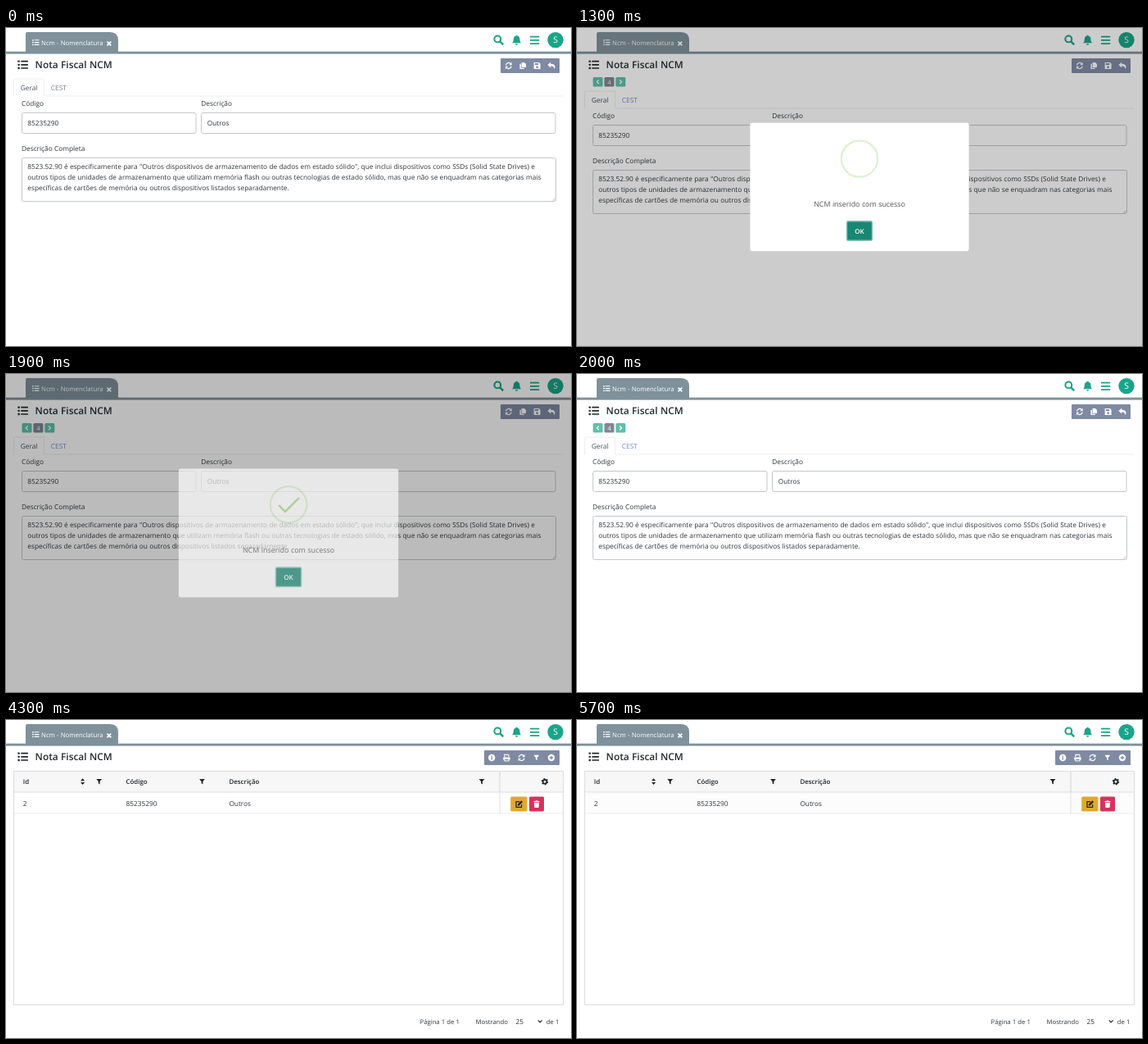
Recreate the animation shown at these times as an HTML page. Size 690 px wide and 388 px high, loop 6500 ms.

```html
<!DOCTYPE html>
<html lang="pt">
<head>
<meta charset="utf-8">
<style>
  html, body { margin: 0; width: 100%; height: 100%; overflow: hidden; background: #fff; }
  svg { display: block; width: 690px; height: 388px; }
  text { font-family: "Open Sans", "Noto Sans", sans-serif; word-spacing: .018em; text-rendering: geometricPrecision; white-space: pre; }
</style>
</head>
<body>
<svg id="stage" viewBox="0 0 690 388"></svg>
<script>
const GREEN = '#1aa589', SLATE = '#7f919b', BAR = '#7f8aa3', INK = '#30353a';

const text = (x, y, s, size = 8.3, fill = INK, extra = '') =>
  `<text x="${x}" y="${y}" font-size="${size}" fill="${fill}" ${extra}>${s}</text>`;
const rect = (x, y, w, h, fill, r = 0, extra = '') =>
  `<rect x="${x}" y="${y}" width="${w}" height="${h}" rx="${r}" fill="${fill}" ${extra}/>`;
const line = (d, color, w = 1, extra = '') =>
  `<path d="${d}" fill="none" stroke="${color}" stroke-width="${w}" ${extra}/>`;
const shape = (d, fill, extra = '') => `<path d="${d}" fill="${fill}" ${extra}/>`;
const at = (x, y, body, scale = 1) => `<g transform="translate(${x} ${y}) scale(${scale})">${body}</g>`;
const group = (id, body) => `<g id="${id}">${body}</g>`;
const field = (x, y, w, h) => rect(x, y, w, h, '#fff', 2, 'stroke="#c3c7cb"');
const BOLD = 'font-weight="600"';

// Icons, centred on 0,0
const list = c => [-4, 0, 4].map(y =>
  rect(-6, y - 1.1, 2.3, 2.3, c, .7) + rect(-2.4, y - .8, 8.4, 1.6, c, .4)).join('');
const filter = c => shape('M-3.4-3.2h6.8l-2.5 3.1v3.4l-1.8-1.2v-2.2z', c);
const refresh = c => line('M-3.4-.7A3.5 3.5 0 0 1 2.7-2.3M3.4.7A3.5 3.5 0 0 1-2.7 2.3', c, 1.3) +
  shape('M3.9-4.2v3.4h-3.4zM-3.9 4.2v-3.4h3.4z', c);
const copy = c => shape('M-1.6-4h3.4l2 2v4h-5.4zM-3.8-2.2h1.5v4.9h3.9v1.4h-5.4z', c);
const save = c => shape('M-4-4h6.3l1.7 1.7v6.3h-8zM-2.8-2.9v2h4.4v-2zM0 .3a1.4 1.4 0 1 0 .01 0z', c, 'fill-rule="evenodd"');
const reply = c => shape('M-4.6-1l3.8-3.3v2c3.4 0 5.3 1.2 5.3 3.6 0 1.2-.7 2.2-1.6 2.8.8-2.7-.7-3.6-3.7-3.6v2z', c);
const info = c => `<circle r="4.2" fill="${c}"/>` + rect(-.7, -.7, 1.4, 3.2, BAR) + rect(-.7, -2.5, 1.4, 1.3, BAR);
const plus = c => `<circle r="4.2" fill="${c}"/>` + line('M-2.3 0h4.6M0-2.3v4.6', BAR, 1.3);
const print = c => rect(-4.2, -.6, 8.4, 3.3, c, .8) + line('M-2.6-.6v-3h4.4l.8.8v2.2', c, 1.1) +
  rect(-2.6, 1.2, 5.2, 2.7, BAR, 0, `stroke="${c}"`);
const gear = c => `<circle r="2.4" fill="none" stroke="${c}" stroke-width="1.8"/>` +
  `<circle r="3.6" fill="none" stroke="${c}" stroke-width="1.2" stroke-dasharray="1.8 1.97"/>`;
const pencil = c => line('M1-2.8h-4.2v6.6h6.6v-3.4', c, 1.2) + line('M-1 1.6L4-3.4', c, 2.2);
const trash = c => rect(-3.6, -3.7, 7.2, 1.2, c, .3) + rect(-1.3, -4.3, 2.6, 1, c) +
  shape('M-3.1-1.9h6.2l-.4 5.5q0 .7-.8.7h-3.8q-.8 0-.8-.7z', c);

const toolbar = (x, icons, gap) => rect(x, 37, 676 - x, 18, BAR, 1) +
  icons.map((icon, i) => at(666 - gap * (icons.length - 1 - i), 46, icon('#fff'))).join('');

const topBar =
  shape('M24 29V7q0-2 2-2h101q10 0 10 10v14z', SLATE) + rect(0, 28.7, 690, 2.9, SLATE) +
  at(36.3, 17.6, list('#fff'), .7) + text(43, 20.8, 'Ncm - Nomenclatura', 7.8, '#fff') +
  line('M123.5 16.6l4.8 4.8m0-4.8l-4.8 4.8', '#fff', 1.7) +
  `<circle cx="600.3" cy="13.4" r="3.9" fill="none" stroke="${GREEN}" stroke-width="2.1"/>` +
  line('M603 16.2l4.2 4.2', GREEN, 2.4) +
  shape('M618 18.2c1.6-1.5 1.7-2.6 1.8-5 .1-2.200 1.300-3.300 3-3.700v-.8h1.600v.8c1.700.4 2.900 1.500 3 3.700.1 2.400.2 3.500 1.800 5zM622 19.200h3.200a1.600 1.600 0 0 1-3.200 0z', GREEN) +
  line('M640 10.700h11.200m-11.200 4.200h11.200m-11.200 4.200h11.200', GREEN, 1.700) +
  `<circle cx="671" cy="14.600" r="9.700" fill="${GREEN}"/>` +
  text(671, 18.400, 'S', 10.400, '#fff', 'text-anchor="middle"');

const title = at(20.700, 44.800, list('#25292d'), 1.050) + text(35.600, 49, 'Nota Fiscal NCM', 11.900, '#25292d', BOLD);

const pagerButton = (x, fill, body) => rect(x, 60, 12, 11.600, fill, 1.500) + at(x + 6, 65.800, body);
const pager =
  pagerButton(19.500, '#5fc0a9', line('M1.200-2.400l-2.400 2.400 2.400 2.400', '#fff', 1.300)) +
  pagerButton(33.400, '#7f8795', text(0, 2.800, '4', 7.600, '#fff', 'text-anchor="middle"')) +
  pagerButton(47.300, '#5fc0a9', line('M-1.200-2.400l2.400 2.400-2.400 2.400', '#fff', 1.300));

const paragraph = [
  '8523.52.90 é especificamente para "Outros dispositivos de armazenamento de dados em estado sólido", que inclui dispositivos como SSDs (Solid State Drives) e',
  'outros tipos de unidades de armazenamento que utilizam memória flash ou outras tecnologias de estado sólido, mas que não se enquadram nas categorias mais',
  'específicas de cartões de memória ou outros dispositivos listados separadamente.'];

const formBody =
  line('M9.500 83.500v-20q0-1.500 1.500-1.500h34q1.500 0 1.500 1.500v19.500H680', '#eceef0') +
  text(17.800, 76, 'Geral', 8.300, '#495057') + text(54.800, 76, 'CEST', 8.300, '#7a8087', 'id="cest"') +
  text(19, 94.700, 'Código') + text(238.300, 94.700, 'Descrição') +
  field(19.500, 103.500, 212.500, 25) + field(238.500, 103.500, 432.500, 25) +
  text(26.300, 119.100, '85235290') + text(245.800, 119.100, 'Outros') +
  text(19, 149.700, 'Descrição Completa') + field(19.500, 158.500, 652, 53) +
  line('M667.500 210.500l3-3m-1 3l1-1', '#999', .600) +
  paragraph.map((s, i) => text(26.300, 171.700 + 13.200 * i, s)).join('');

const form = group('pager', pager) + group('formBody', formBody) +
  toolbar(604, [refresh, copy, save, reply], 17.400) +
  rect(640.500, 37, 17, 18, '#5b6fae', 1, 'id="saveFocus" fill-opacity=".35"') +
  rect(658, 37.500, 17.500, 17, '#3f4a66', 1, 'id="backHover" fill-opacity=".35"');

const row = rect(10, 88.500, 670, 25.500, '#000', 0, 'id="rowHover"') +
  text(20.800, 104.500, '2') + text(146.500, 104.500, '85235290') + text(272.400, 104.500, 'Outros') +
  line('M10 114h670', '#ebebeb') +
  rect(616.200, 93.500, 20.300, 18, '#e0a92e', 1.500) + at(626.200, 102.500, pencil('#222')) +
  rect(639, 93.500, 18, 18, '#d6335c', 1.500) + at(648, 102.600, trash('#fff')) +
  line('M603 88.500v25.500', '#e0e0e0') +
  text(505.600, 370.600, 'Página 1 de 1', 7.700) + text(659.800, 370.600, 'de 1', 7.700);

const table = toolbar(584, [info, print, refresh, filter, plus], 18.200) +
  rect(9.500, 62.500, 671, 285, '#fff', 0, 'stroke="#dcdcdc"') +
  rect(10, 63, 670, 25, '#f7f7f8') + line('M10 88h670', '#dedede') + line('M603 63v25', '#d4d4d8') +
  [['Id', 20.800], ['Código', 146.500], ['Descrição', 272.400]].map(([s, x]) => text(x, 78.400, s, 7.900, '#212529', BOLD)).join('') +
  shape('M91 74.300l2.600-3 2.600 3zM91 75.900l2.600 3 2.600-3z', '#212529') +
  [113.700, 239.500, 581].map(x => at(x, 75.200, filter('#212529'))).join('') + at(658, 75.200, gear('#212529')) +
  group('row', row) + text(573.600, 370.600, 'Mostrando', 7.700) + text(622.400, 370.600, '25', 8.300) +
  line('M649.800 366.500l2.400 2.300 2.400-2.300', '#333', 1.200);

const spinner = `<circle r="19" fill="none" stroke="${GREEN}" stroke-opacity=".22" stroke-width="2.200"/>` +
  line('M-13.430 13.430A19 19 0 0 1-13.430-13.430', GREEN, 2.200);

const popup = rect(184, 99.700, 322, 188.500, '#fff', 3) +
  '<circle cx="345" cy="152.500" r="26.700" fill="none" stroke="#dbf1cf" stroke-width="2.700"/>' +
  line('M330.800 153.200l9.200 9.600 20.600-20.200', '#a5dc86', 3, 'id="check" pathLength="1" stroke-dasharray="1 2"') +
  text(345, 222.800, 'NCM inserido com sucesso', 10.700, '#545454', 'text-anchor="middle"') +
  rect(326.300, 244.300, 37.400, 28.400, '#178874', 2, 'stroke="#8fc4ba" stroke-width="1.800"') +
  text(345, 262.400, 'OK', 9.600, '#fff', 'text-anchor="middle" ' + BOLD);

const status = shape('M0 380.300h228q1.600 0 1.600 1.600v6.100H0z', '#1f1f1f') +
  text(1.500, 385.600, 'Aguardando apresentacao.gestao.plus...', 4.050, '#ddd');

document.getElementById('stage').innerHTML = rect(0, 0, 690, 388, '#fff') + topBar +
  group('page', title + group('form', form) + group('table', table)) +
  group('spinner', spinner) + group('status', status) +
  group('modal', rect(0, 0, 690, 388, '#000', 0, 'id="shade"') + group('popup', popup));

const el = id => document.getElementById(id);
const set = (id, name, value) => el(id).setAttribute(name, value);
const show = (id, on) => set(id, 'display', on ? 'inline' : 'none');
const ramp = (t, a, b) => Math.min(1, Math.max(0, (t - a) / (b - a)));
const within = (t, a, b) => t >= a && t < b;

function popupScale(p) {
  if (p < .45) return .7 + .35 * p / .45;
  if (p < .8) return 1.05 - .1 * (p - .45) / .35;
  return .95 + .05 * (p - .8) / .2;
}

function render(now) {
  const t = Math.floor(now % 6500 / 100) * 100;
  const saved = t >= 1300;
  const saving = within(t, 700, 1300), loading = within(t, 3800, 4200);
  const busy = saving ? ramp(t, 600, 900) : loading ? 1 : 0;

  show('page', !within(t, 2900, 3700));
  show('form', t < 2900);
  show('table', t >= 3700);
  show('row', t >= 4200);
  show('status', within(t, 3000, 3700));
  set('page', 'opacity', 1 - .53 * busy);

  show('pager', saved);
  set('formBody', 'transform', `translate(0 ${saved ? 15 : 0})`);
  set('cest', 'fill', saved ? '#6f8cc8' : '#7a8087');
  show('saveFocus', within(t, 600, 1300));
  show('backHover', within(t, 2600, 2900));
  set('rowHover', 'fill-opacity', t < 4900 ? 0 : .022 - .01 * ramp(t, 5200, 5700));

  show('spinner', busy > 0);
  set('spinner', 'opacity', busy);
  set('spinner', 'transform', `translate(345 209.500) rotate(${(t - 1200) / 1100 * 360 - 8})`);

  const hide = ramp(t, 1850, 2000);
  const scale = popupScale(ramp(t, 1250, 1550)) * (1 - .5 * hide);
  show('modal', within(t, 1300, 2000));
  set('shade', 'opacity', .4 * ramp(t, 1200, 1400) * (1 - hide));
  set('popup', 'opacity', 1 - hide);
  set('popup', 'transform', `translate(345 194) scale(${scale}) translate(-345 -194)`);
  set('check', 'stroke-dashoffset', 1 - ramp(t, 1300, 1700));
}

const start = performance.now();
function tick() {
  render(performance.now() - start);
  requestAnimationFrame(tick);
}
tick();
</script>
</body>
</html>
```
